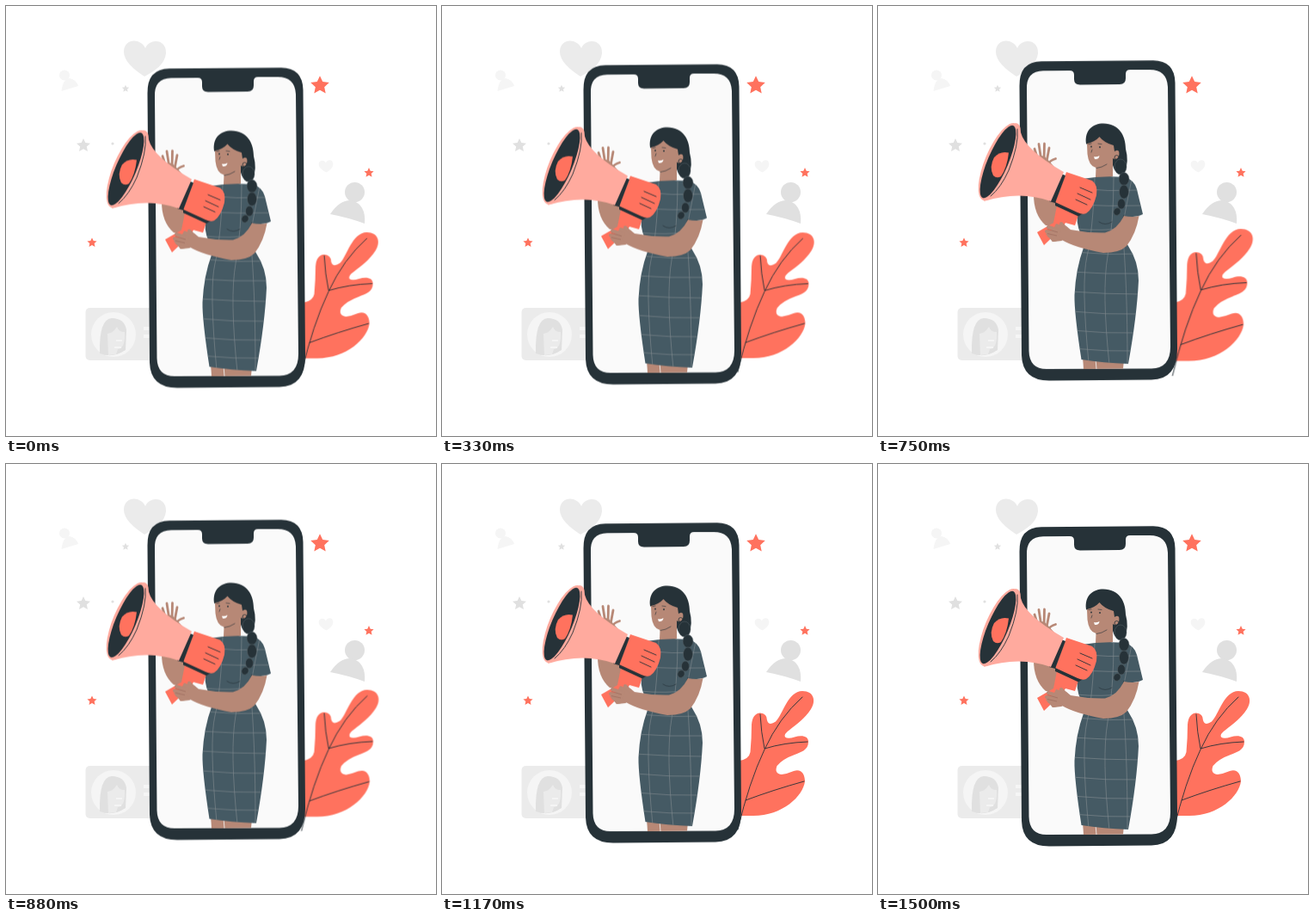
An HTML page for the animation above (1.54 s loop, 500x500 px).

```html
<!DOCTYPE html>
<html lang="en">
<head>
<meta charset="utf-8">
<title>Phone announcement</title>
<style>
html, body { margin: 0; width: 100%; height: 100%; overflow: hidden; background: #fff; }
svg { display: block; width: 100%; height: 100%; }
.float { animation: float 1540ms linear -41ms infinite; }
.leaf { transform-origin: 370px 345px; animation: beat 1540ms ease-in-out infinite; }
@keyframes float {
  50% { transform: translateY(-9.2px); }
}
@keyframes beat {
  0% { transform: scale(1.01); }
  11% { transform: scale(1.06); }
  24%, 37% { transform: scale(1.003); }
  47.5% { transform: scale(1.06); }
  63%, 100% { transform: scale(1); }
}
.red { fill: #ff725e; }
.pink { fill: #ffaa9e; }
.dark { fill: #263238; }
.skin { fill: #b78876; }
.line { fill: none; stroke: #263238; stroke-width: .9; stroke-linecap: round; }
.thin { stroke-width: .6; }
.hand { fill: none; stroke: #b78876; stroke-linecap: round; stroke-linejoin: round; }
</style>
</head>
<body>
<svg viewBox="0 0 500 500">
  <defs>
    <path id="star" d="M0-1L.3-.36 1-.28.48.2.62.88 0 .54-.62.88-.48.2-1-.28-.3-.36Z"/>
    <path id="heart" d="M0 21C-15 11-24 2-24-8C-24-23-5-25 1-12C6-24 26-23 25-6C24 6 13 14 0 21Z"/>
    <path id="dress" d="M237 210Q260 206 287 208Q298 211 301 222L308 251Q300 255 286 254L284 266Q286 280 291 288Q303 306 303 328Q301 370 291 425Q262 424 236.500 420Q228 365 228.500 345Q230 314 239 290L236 275Q229 260 233 243Z"/>
    <clipPath id="dressClip"><use href="#dress"/></clipPath>
  </defs>

  <g id="backdrop">
    <use href="#heart" transform="translate(161 61)" fill="#ebebeb"/>
    <use href="#heart" transform="translate(372 186.500) rotate(-5) scale(.34)" fill="#f5f5f5"/>
    <g fill="#f5f5f5">
      <circle cx="68" cy="80.500" r="6"/>
      <path d="M64.500 99Q66 85 74 84Q82 86 84 93Z"/>
    </g>
    <g fill="#e0e0e0">
      <circle cx="405.500" cy="216.500" r="11.500"/>
      <path d="M377 242Q388 225 402 226Q419 231 417 253Q398 246 377 242Z"/>
      <use href="#star" transform="translate(90 162) scale(8)"/>
      <use href="#star" transform="translate(139 96) scale(4.200)"/>
      <circle cx="124" cy="160" r="1.600"/>
    </g>
    <g class="red">
      <use href="#star" transform="translate(365 92) scale(10.800)"/>
      <use href="#star" transform="translate(422 193.700) scale(5.600)"/>
      <use href="#star" transform="translate(100 275) scale(5.600)"/>
    </g>
    <rect x="92.500" y="351" width="230" height="61" rx="5" fill="#ebebeb"/>
    <circle cx="125" cy="382" r="26" fill="#f5f5f5"/>
    <path d="M109 404Q108 364 123 363Q138 363 140 377L139 400Q124 410 109 404Z" fill="#e0e0e0"/>
    <path d="M118 381Q125 380 129 373Q131 379 138 379Q139 398 130 399L128 405 119 406Z" fill="#ebebeb"/>
    <path d="M128 389h7M126 397h8" stroke="#f7f7f7" stroke-width="1.500"/>
    <path d="M160 375h8M160 384h8" stroke="#f5f5f5" stroke-width="4"/>
  </g>

  <g class="leaf">
    <path class="red" d="M344 409L346 345Q357 343 358.500 335Q360 318 360 303Q361 290 370 289.500Q378 290 378 298Q380 305 388 299.500C396 292 402 264 419 264C433 264 435 276 429 285C422 296 412 303 405 308.500Q397 314 399 317.500Q402 320 410 317.500C418 315 426 316 426 323C426 333 417 335 410 338Q396 343 389.500 351Q386 360 395 361Q402 360 409 357C418 354 422 361 422 369C420 386 396 409 362 409Z"/>
    <path class="line" d="M419 271Q392 295 375 332Q357 370 344 425M370 291Q371 312 375 331Q398 324 425 323M353 391Q385 379 421 369"/>
  </g>

  <g class="float">
    <path class="dark" d="M164.500 102Q164 73.500 190 73.200L320 72.200Q345 72.500 345.500 98L348 408Q348 443 318 443.500L200 444.500Q168 445 167 415Z"/>
    <path fill="#fafafa" d="M173 106Q172 84.500 192 84.200L223 84Q228 84 228 89V94Q228 100.500 235 100.500L281 100Q288 100 288 93V88Q288 83 293 83L316 83Q336 83 337 103L340 405Q340 430 318 430.500L196 431Q176 431 175.500 410Z"/>

    <g id="woman">
      <path class="skin" d="M238 416L286 420 285 430.500 239 431Z"/>
      <path d="M253 419L254 431" stroke="#fafafa" stroke-width=".8"/>
      <path class="skin" d="M181 228Q181 252 195 264L214 265 211 236Z"/>
      <path class="skin" d="M182 196L184 185Q191 180 197 187L205 196 190 208Z"/>
      <path class="hand" stroke-width="2.800" d="M187 191L182 175M190 189L187 169.500M193 189L193.500 169M196 190L199 174M197 194Q200 188 206.500 186.500"/>
      <path class="dark" d="M242 169C240 153 250 145.500 262 145.500C280 146 288 159 288 175Q292 190 287 201Q276 207 273 194Z"/>
      <path class="skin" d="M243 169Q252 167 257.500 161Q263 168 274 171L275 178Q282 174 280 184Q277 189 273 186L273 207Q263 212 253 208L253.500 197Q245 195 243.500 181Z"/>
      <path class="line thin" d="M254 197.500Q260 197 266 193M249 176l-1 3M245 169.500l3-.5M256 169l4 .5"/>
      <circle class="dark" cx="248" cy="172.500" r=".9"/>
      <circle class="dark" cx="258" cy="173" r=".9"/>
      <path fill="#fff" d="M251 184Q254 185 257.500 183Q257 187.500 252 187Z"/>
      <circle cx="277.500" cy="185" r="2.500" fill="none" stroke="#263238" stroke-width=".8"/>
      <use href="#dress" fill="#455a64"/>
      <g clip-path="url(#dressClip)" fill="none" stroke="#808a8e" stroke-width=".65">
        <path d="M252 208Q250 270 243 300T245 424M274 208Q274 260 267 300T269 426M295 210L284 266Q290 330 290 425"/>
        <path d="M230 221q38 4 75 2M230 240q38 2 76 1M230 268q30 3 60-1M228 295q40 4 78 2M225 318q40 3 80 2M225 341q40 3 80 3M225 364q40 4 80 3M225 386q40 4 80 3M225 407q40 4 80 3"/>
      </g>
      <path class="line thin" d="M257 260Q264 265 272 260M283 266Q283 259 286 252"/>
      <g class="dark" stroke="#59656a" stroke-width=".5">
        <ellipse cx="282" cy="196" rx="7" ry="9"/>
        <ellipse cx="286" cy="210" rx="6" ry="7.500"/>
        <ellipse cx="286" cy="225" rx="5.500" ry="8"/>
        <ellipse cx="283" cy="239" rx="4.500" ry="6"/>
        <ellipse cx="278" cy="248" rx="4" ry="4.500" transform="rotate(30 278 248)"/>
      </g>
    </g>

    <g id="megaphone">
      <path class="red" d="M208 241L233 252 229 264 218 261 215 266 193 287 185 272 204 261Z"/>
      <path class="dark" d="M206 236L240 249 233 253.500 206 241Z"/>
      <path class="red" d="M219 202L249 212Q256 217 254 229Q250 245 242 250Q238 252 232 249L206 237Z"/>
      <path class="line" d="M235 220L249 226M232 227L247 234M230 234L243 240"/>
      <path class="dark" d="M213 204L218 206 206 238 199 236Z"/>
      <path class="pink" d="M160 145Q166 145 166 156Q171 176 216 202L201 236Q165 223 123 236Z"/>
      <ellipse class="pink" cx="141" cy="190" rx="16.500" ry="48.500" transform="rotate(23 141 190)"/>
      <ellipse class="dark" cx="139.500" cy="190" rx="12" ry="45.500" transform="rotate(23 139.500 190)"/>
      <path class="red" d="M152 179.500Q142 177 135 185Q129 196 134 206Q138 210 143 207Q150 197 152 179.500Z"/>
      <path class="line" d="M162 152Q164 170 152 200Q143 220 131 230"/>
    </g>

    <path class="skin" d="M286 253Q296 255 303.500 253Q300 274 289 288Q281 296 262 296Q229 290 214 281L203 283 195 274 204 268 207 262 219 265 224 269Q244 273 264 272.500Q278 269 286 253Z"/>
    <path class="hand" stroke-width="4" d="M211 270L198 266M209 274L196 271M210 278L199 276M213 280L204 281M219 268L213 262"/>
    <path d="M197 268.500L209 272M197 273.500L208 276" stroke="#95675a" stroke-width=".6"/>
  </g>
</svg>
</body>
</html>
```
